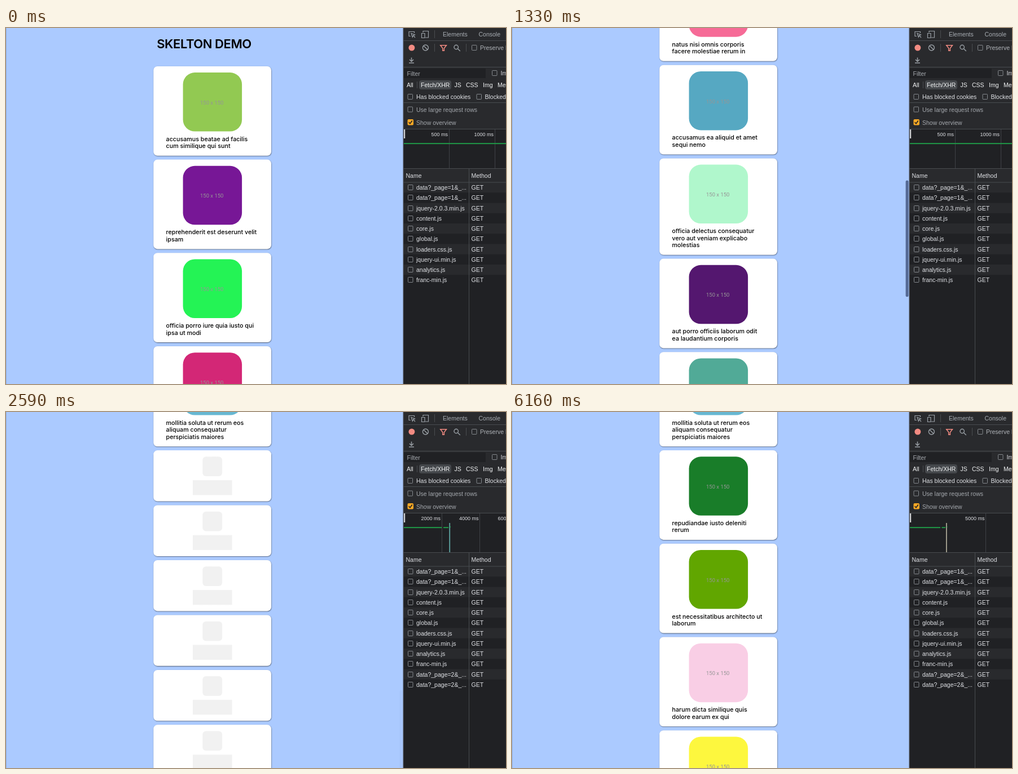
An HTML page with a canvas that plays this animation: 886 px wide and 632 px high, repeating every 6.37 s.

```html
<!DOCTYPE html>
<html lang="en">
<head>
<meta charset="utf-8">
<title>Skeleton loading demo</title>
<style>
html, body { margin: 0; width: 886px; height: 632px; overflow: hidden; background: #abcaff; }
canvas { display: block; }
</style>
</head>
<body>
<canvas id="stage" width="886" height="632"></canvas>
<script>
const ctx = document.getElementById('stage').getContext('2d');
const LOOP = 6370, STEP = 70;
const SKELETON_AT = 1680, LOADED_AT = 5880;
const UI = '"Liberation Sans", Arial, sans-serif';
const LINE = 12.5, IMAGE = 104.5, LEFT = 261.3, WIDTH = 208.7, CENTER = 365.8;

const cards = [
  ['#92c952', 'accusamus beatae ad facilis|cum similique qui sunt'],
  ['#771796', 'reprehenderit est deserunt velit|ipsam'],
  ['#24f355', 'officia porro iure quia iusto qui|ipsa ut modi'],
  ['#d32776', 'culpa odio esse rerum omnis|laboriosam voluptate|repudiandae'],
  ['#f66b97', 'natus nisi omnis corporis|facere molestiae rerum in'],
  ['#56a8c2', 'accusamus ea aliquid et amet|sequi nemo'],
  ['#b0f7cc', 'officia delectus consequatur|vero aut veniam explicabo|molestias'],
  ['#54176f', 'aut porro officiis laborum odit|ea laudantium corporis'],
  ['#51aa97', 'qui eius qui autem sed'],
  ['#810b14', 'beatae et provident et ut vel'],
  ['#1ee8a4', 'nihil at amet non hic quia qui'],
  ['#66b7d2', 'mollitia soluta ut rerum eos|aliquam consequatur|perspiciatis maiores'],
  ['#197d29', 'repudiandae iusto deleniti|rerum'],
  ['#61a600', 'est necessitatibus architecto ut|laborum'],
  ['#f9cee5', 'harum dicta similique quis|dolore earum ex qui'],
  ['#fdf73e', 'iusto sunt nobis quasi veritatis|quas expedita voluptatum|deserunt']
].map(([color, title]) => ({ color, lines: title.split('|') }));
const FIRST_PAGE = 12;

let nextTop = 67.9;
for (const card of cards) {
  card.top = nextTop;
  card.height = 146.3 + LINE * (card.lines.length - 1);
  nextTop += card.height + 6.9;
}

const scrollKeys = [[0, 0], [70, 12], [210, 130], [350, 250], [490, 320], [700, 320], [770, 345],
  [1050, 609.3], [1330, 843.2], [1470, 975], [1610, 1404.2], [1680, 1404.2], [1750, 1800],
  [1820, 1987.3], [1960, 1988.2], [LOOP, 1988.2]];

function scrollAt(t) {
  const i = scrollKeys.findIndex(key => key[0] > t);
  const [t0, y0] = scrollKeys[i - 1], [t1, y1] = scrollKeys[i];
  return y0 + (y1 - y0) * (t - t0) / (t1 - t0);
}

function box(x, y, w, h, color) {
  ctx.fillStyle = color;
  ctx.fillRect(x, y, w, h);
}

function round(x, y, w, h, r, color) {
  ctx.fillStyle = color;
  ctx.beginPath();
  ctx.roundRect(x, y, w, h, r);
  ctx.fill();
}

function text(str, x, y, color, font, align = 'left') {
  ctx.font = font;
  ctx.fillStyle = color;
  ctx.textAlign = align;
  ctx.fillText(str, x, y);
}

function stroke(path, color, width = 1.2) {
  ctx.strokeStyle = color;
  ctx.lineWidth = width;
  ctx.stroke(new Path2D(path));
}

function panel(y, h) {
  ctx.save();
  ctx.shadowColor = 'rgba(0,0,0,.55)';
  ctx.shadowBlur = 1.5;
  ctx.shadowOffsetX = 0.4;
  ctx.shadowOffsetY = 0.8;
  round(LEFT, y, WIDTH, h, 7, '#fff');
  ctx.restore();
}

const bodyFont = '500 10.7px Inter, sans-serif';

function drawCard(card, scroll) {
  const y = card.top - scroll;
  if (y > 640 || y + card.height < -5) return;
  panel(y, card.height);
  round(313.6, y + 11.2, IMAGE, IMAGE, 21, card.color);
  text('150 x 150', 364.7, y + 67.8, '#969696', '9.5px Roboto, sans-serif', 'center');
  const single = card.lines.length === 1;
  card.lines.forEach((line, i) => text(line, single ? CENTER : 283.6, y + 132.7 + i * LINE,
    '#000', bodyFont, single ? 'center' : 'left'));
}

function shimmerFill(bandX) {
  const fill = ctx.createLinearGradient(bandX - 2, 0, bandX + 34, 0);
  fill.addColorStop(0, '#f1f1f1');
  fill.addColorStop(0.4, '#e8e8e8');
  fill.addColorStop(0.6, '#e8e8e8');
  fill.addColorStop(1, '#f1f1f1');
  return fill;
}

function drawSkeleton(y, fill) {
  panel(y, 90.4);
  round(348.3, y + 11.2, 34.8, 34.8, 6, fill);
  box(331, y + 53, 69.6, 26.4, fill);
}

function drawOutlines(list, scroll) {
  ctx.strokeStyle = '#93d3d2';
  ctx.lineWidth = 1.6;
  ctx.strokeRect(0.8, -2, 703, 636);
  ctx.lineWidth = 1;
  ctx.strokeRect(233.5, -2, 470, 636);
  ctx.lineWidth = 1.6;
  ctx.strokeRect(261.3, -2, 209.4, 636);
  ctx.font = bodyFont;
  for (const { top, height, lines } of list) {
    const y = top - scroll;
    const w = lines.length > 1 ? 164 : ctx.measureText(lines[0]).width;
    ctx.strokeRect(261.3, y, 208.7, height);
    ctx.strokeRect(313.6, y + 11.4, IMAGE, IMAGE);
    ctx.strokeRect(CENTER - w / 2, y + 122.9, w, LINE * lines.length);
  }
}

function drawScrollbar(t, scroll) {
  if (t < 70) return;
  const view = 652, full = t < SKELETON_AT ? 2056 : 2640;
  const fade = Math.min(1, Math.max(0, (t - 2100) / 490));
  ctx.globalAlpha = t >= LOADED_AT ? 0 : 1 - 0.96 * fade;
  round(697.6, 3 + scroll * view / full, 5, view * view / full, 2.5, '#546994');
  ctx.globalAlpha = 1;
}

function drawPage(t) {
  const scroll = scrollAt(t);
  box(0, 0, 704, 632, '#abcaff');
  box(0, 0, 0.6, 632, '#7f9bcd');
  ctx.letterSpacing = '-0.45px';
  text('SKELTON DEMO', 267.2, 36 - scroll, '#000', '600 22px Inter, sans-serif');
  ctx.letterSpacing = '0px';

  const loaded = t >= LOADED_AT;
  cards.slice(0, loaded ? cards.length : FIRST_PAGE).forEach(card => drawCard(card, scroll));
  if (t >= SKELETON_AT && !loaded) {
    const sweepStart = t < 3780 ? 1731 : 3780;
    const fill = shimmerFill(352 + (Math.min(t, 3920) - sweepStart) * 0.314);
    for (let i = 0; i < 6; i++) drawSkeleton(cards[FIRST_PAGE].top + i * 97.45 - scroll, fill);
  }
  if (t >= SKELETON_AT && t < 1960) drawOutlines(cards.slice(7, 12), 1404.2);
  if (loaded && t < 6160) drawOutlines(cards.slice(11), scroll);
  drawScrollbar(t, scroll);
}

const BAR = '#292a2d', DARK = '#202124', RULE = '#494c50', GRAY = '#9aa0a6', PALE = '#dfe1e5';
const uiFont = '10.5px ' + UI;
const label = (str, x, y, color = PALE) => text(str, x, y, color, uiFont);
const rule = y => box(704, y, 182, 1, RULE);

function checkbox(x, y) {
  ctx.strokeStyle = '#85898e';
  ctx.lineWidth = 1;
  ctx.beginPath();
  ctx.roundRect(x + 0.5, y + 0.5, 8.5, 9, 0.8);
  ctx.stroke();
}

function drawToolbar() {
  box(704, 0, 182, 179, BAR);
  [22, 69, 132].forEach(rule);
  stroke('M717 14.5H714V6.5H723.5V9M718 9.5L724.5 12L721.5 13.2L720.3 16.2ZM721.5 13L725 17', GRAY);
  stroke('M739 8V5.5H748.5V17H743M736.5 9.5H742V17.5H736.5Z', GRAY);
  label('Elements', 774, 15, '#a9aeb4');
  label('Console', 837.5, 15, '#a9aeb4');
  box(759, 4, 1, 14, RULE);

  round(713.4, 29.6, 11, 11, 5.5, '#f28b82');
  stroke('M738.4 35a5 5 0 1 0 10 0a5 5 0 1 0 -10 0M740 31.5L747 38.5', GRAY, 1.4);
  stroke('M769.8 30.8H780.4L776.4 36V40.3H773.8V36Z', '#f28b82', 1.5);
  stroke('M794 34a3.7 3.7 0 1 0 7.4 0a3.7 3.7 0 1 0 -7.4 0M800.4 36.8L804.8 41', GRAY, 1.4);
  box(759, 28, 1, 14, RULE);
  box(815, 28, 1, 14, RULE);
  checkbox(825, 30);
  label('Preserve log', 840, 39, '#b0b4b9');
  stroke('M718.5 52.5V59M715 56L718.5 59.5L722 56M714 62H723', GRAY, 1.5);

  box(705, 72, 145, 17, DARK);
  label('Filter', 710.5, 85, '#a4a8ad');
  checkbox(861, 75);
  label('Invert', 876.5, 84);

  round(732, 93, 57, 16, 4, '#45484c');
  box(728, 95, 1, 12, RULE);
  [['All', 710], ['Fetch/XHR', 735], ['JS', 794.5], ['CSS', 815], ['Img', 845], ['Media', 871]]
    .forEach(([name, x]) => label(name, x, 104.5, '#f1f3f4'));

  checkbox(711.5, 117);
  label('Has blocked cookies', 727, 126);
  checkbox(833.5, 117);
  label('Blocked Requests', 848.5, 126);
  checkbox(711.5, 139.5);
  label('Use large request rows', 727, 148.5, '#a4a8ad');
  round(711.5, 162, 10.5, 10.5, 2, '#f9a825');
  stroke('M713.7 167.3L716 169.7L719.8 164.5', DARK, 1.6);
  label('Show overview', 727, 171.5, '#a4a8ad');
}

function drawOverview(t) {
  box(704, 179, 182, 71, DARK);
  rule(179);
  rule(249);
  const [marks, greens, bar, barColor] =
    t < SKELETON_AT ? [[[785, 500], [866, 1000]], [[705, 886]]] :
    t < 3780 ? [[[772, 2000], [839.5, 4000], [908, 6000]], [[705, 772], [775, 784]], 785.3, '#5fa6a3'] :
    [[[839.5, 5000]], [[705, 759], [761.5, 768]], 769, '#aaa695'];
  for (const [x, ms] of marks) {
    box(Math.floor(x), 180, 1, 69, '#3f4246');
    text(ms + ' ms', x - 2, 191.5, PALE, '9px ' + UI, 'right');
  }
  for (const [from, to] of greens) box(from, 204.2, to - from, 1.9, '#1f9d48');
  if (bar) {
    box(bar, 197, 1.8, 52, barColor);
    box(bar + 1.5, 203, 1, 2, '#1f9d48');
  }
  box(705, 180, 2.2, 16, '#d0d2d5');
}

const requests = ['data?_page=1&_...', 'data?_page=1&_...', 'jquery-2.0.3.min.js', 'content.js', 'core.js',
  'global.js', 'loaders.css.js', 'jquery-ui.min.js', 'analytics.js', 'franc-min.js',
  'data?_page=2&_...', 'data?_page=2&_...'];

function drawRequests(t) {
  box(704, 250, 182, 24, BAR);
  box(704, 274, 182, 358, DARK);
  const count = t < SKELETON_AT ? 10 : t < 1960 ? 11 : 12;
  requests.slice(0, count).forEach((name, i) => {
    const y = 274 + i * 18.25;
    if (i % 2 === 0) box(704, y, 182, 18.25, BAR);
    checkbox(712, Math.round(y + 4));
    label(name, 727, y + 13);
    label('GET', 824.5, y + 13);
  });
  rule(273.5);
  box(820, 250, 1, 382, RULE);
  label('Name', 708.5, 265.5);
  label('Method', 824.5, 265.5);
}

function frame(now) {
  const t = Math.floor(now % LOOP / STEP) * STEP;
  drawPage(t);
  drawToolbar();
  drawOverview(t);
  drawRequests(t);
  box(703.5, 0, 1.2, 632, '#4a4f58');
  requestAnimationFrame(frame);
}
requestAnimationFrame(frame);
</script>
</body>
</html>
```
